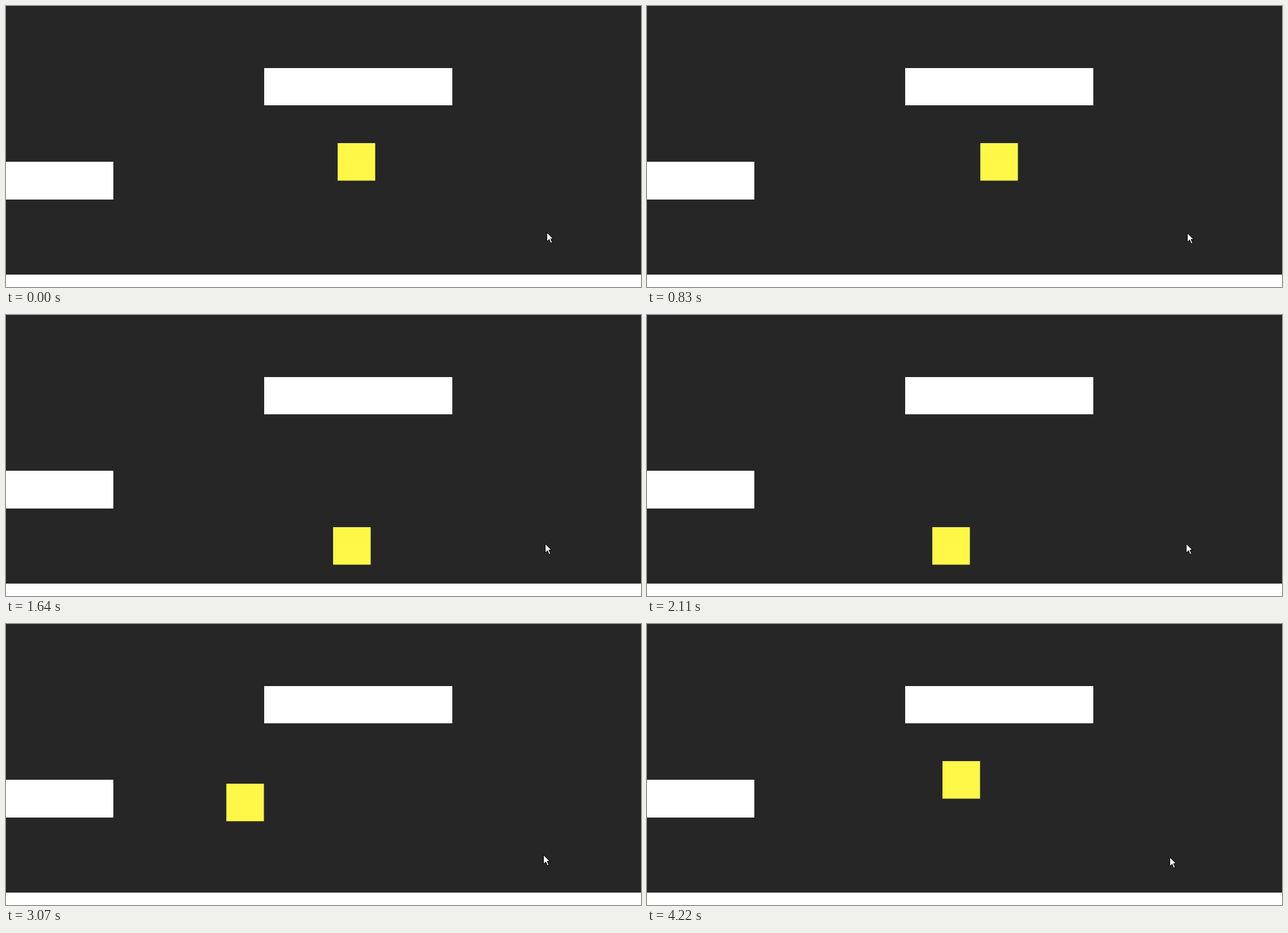
These frames come from a looping animation (1124x498 px, 4290 ms). An HTML page with a canvas:

```html
<!DOCTYPE html>
<html>
<head>
<meta charset="utf-8">
<style>
html, body { margin: 0; height: 100%; overflow: hidden; background: #262626; }
canvas { display: block; }
</style>
</head>
<body>
<canvas width="1124" height="498"></canvas>
<script>
const LOOP = 4290, CELL = 200 / 3;
const STEP = 70, MOVE = 3 * STEP; // ms per refresh, ms per cell
const ctx = document.querySelector('canvas').getContext('2d');
const arrow = new Path2D('M.5 .5V16.5L4.5 12.5L6.5 17.5L7.5 18.5H8.5L9.5 17.5L7 11.5H11.5Z');
const directions = { L: [-1, 0], R: [1, 0], U: [0, -1], D: [0, 1] };

// key presses: time first seen, ms already under way, cells to cross
const presses = [
  [0, 11, 'L'], [610, 35, 'R'], [1010, 0, 'DD'], [1640, 35, 'L'], [2110, 58, 'L'],
  [2450, 0, 'L'], [2780, 14, 'UU'], [3730, 65, 'R'], [4010, 35, 'R']
];
// resting places of the pointer: time, x, y
const rests = [
  [0, 957, 401], [680, 956, 402], [1150, 955, 404],
  [1360, 954, 405], [2850, 951, 409], [3455, 925, 413]
];

function playerAt(t) {
  let x = 590, y = 728 / 3;
  for (const [first, lead, path] of presses) {
    if (t < first) break;
    const elapsed = lead + Math.floor((t - first) / STEP) * STEP;
    const cells = Math.min(path.length, elapsed / MOVE);
    const [dx, dy] = directions[path[0]];
    x += dx * cells * CELL;
    y += dy * cells * CELL;
  }
  return [Math.round(x), Math.round(y)];
}

function box(color, x, y, w, h) {
  ctx.fillStyle = color;
  ctx.fillRect(x, y, w, h);
}

function draw(t) {
  box('#262626', 0, 0, 1124, 498);
  box('#fff', 457, 110, 333, 66);
  box('#fff', 0, 276, 190, 67);
  box('#fff', 0, 476, 1124, 22);
  box('#fff848', ...playerAt(t), 66.5, 66.5);

  const [, x, y] = rests.findLast(rest => rest[0] <= t);
  ctx.save();
  ctx.translate(x, y);
  ctx.fillStyle = '#fff';
  ctx.fill(arrow);
  ctx.stroke(arrow);
  ctx.restore();
}

function tick() {
  draw(performance.now() % LOOP);
  requestAnimationFrame(tick);
}
tick();
</script>
</body>
</html>
```
